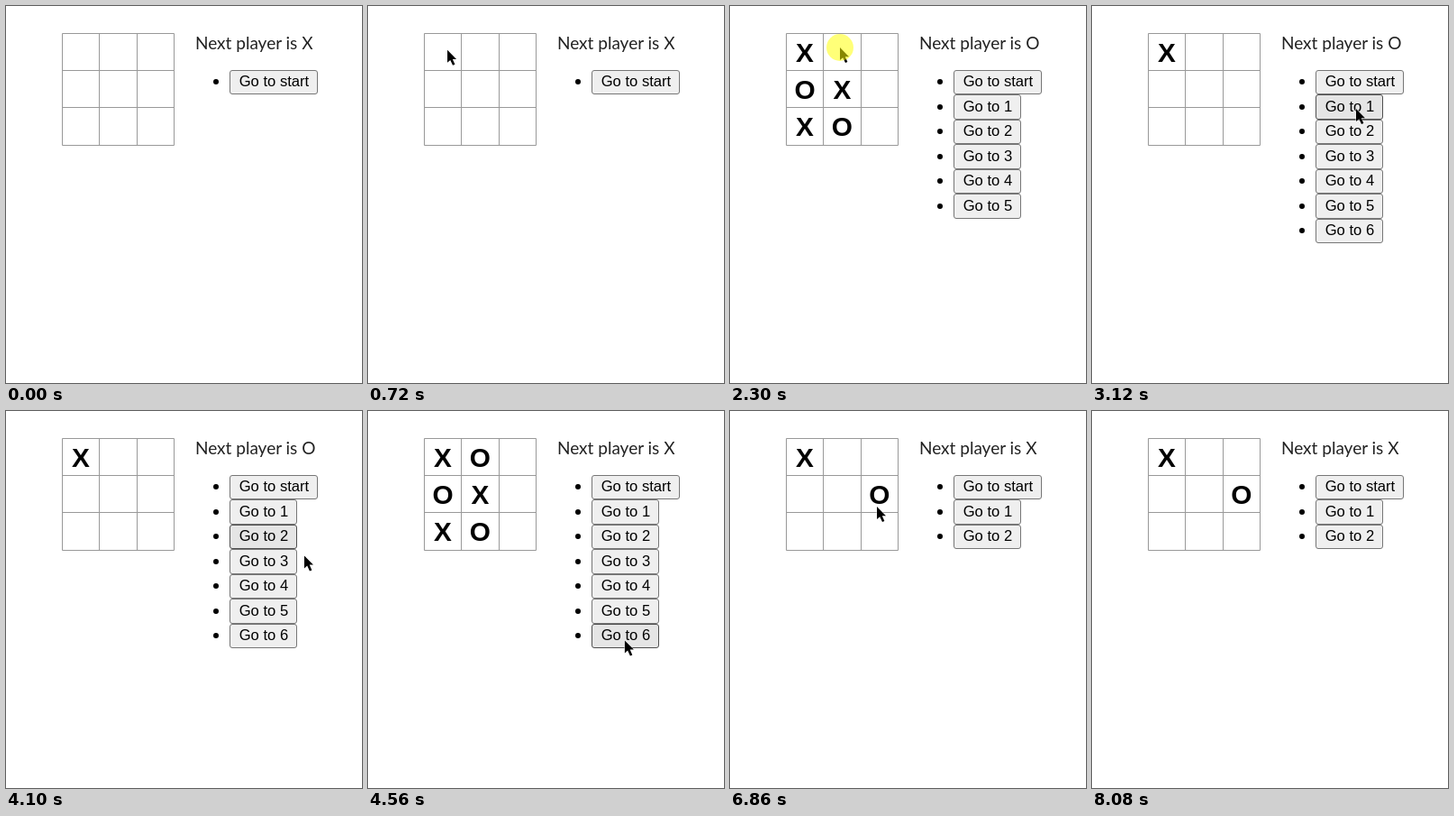
Animation of 395 by 418 pixels, one loop 8.59 s. Source, as an HTML page:

```html
<!DOCTYPE html>
<html lang="en">
<head>
<meta charset="utf-8">
<title>Tic-tac-toe</title>
<style>
  html, body { margin: 0; width: 100%; height: 100%; overflow: hidden; background: #fff; }
  svg { display: block; }
  .grid { fill: none; stroke: #999; }
  .mark { font: bold 29.8px "Liberation Sans", Arial, sans-serif; text-anchor: middle; }
  .status { font: 19px Lato, sans-serif; fill: #222; }
  .button { font: 16.6px "Liberation Sans", Arial, sans-serif; }
  .button rect { fill: #efefef; stroke: #767676; }
  .button.hover rect { fill: #e5e5e5; stroke: #4f4f4f; }
</style>
</head>
<body>
<svg id="stage" width="395" height="418"></svg>
<script>
const LOOP = 8590, ENTER = 30, EXIT = 8080;
const PRESS = 70, HOVER_LAG = 40, FIRST = 760, BEAT = 308;
const stage = document.getElementById('stage');
const game = [0, 3, 6, 7, 4, 1];

// press time, cells shown afterwards, moves listed
const clicks = [
  ...game.map((_, i) => [FIRST + i * BEAT, game.slice(0, i + 1), i + 1]),
  [3010, [0], 6], [4460, game, 6], [5640, [0], 6], [6560, [0, 5], 2]
];

const mix = (a, b, u) => a + (b - a) * u;
const ease = u => u * u * (3 - 2 * u);
const glide = (from, to, a, b) => [from, to, u => a.map((v, k) => mix(v, b[k], ease(u)))];

// where the pointer aims inside a cell
function aim(cell) {
  const col = cell % 3, row = Math.floor(cell / 3);
  return [86 + 36 * col + 2.5 * row, 46 + 43 * row];
}

// one clockwise lap around the move list, slowing down
function lap(u) {
  const angle = mix(-70, 438, u * (4 - u) / 3) * Math.PI / 180;
  return [272 + 62 * Math.cos(angle), 183 + 73 * Math.sin(angle)];
}

// up over the status line, then down along the right side
const swing = u => [
  mix(163, 351, u) + 105 * Math.sin(Math.PI * u),
  mix(106, 168, u) - 80 * Math.sin(2 * Math.PI * u)
];

const first = [293, 114], back = [293, 122], middle = [163, 106];
const motion = [
  glide(ENTER, FIRST, [337, 374], aim(game[0])),
  ...game.slice(1).map((cell, i) => {
    const press = FIRST + (i + 1) * BEAT;
    return glide(press - BEAT / 2, press, aim(game[i]), aim(cell));
  }),
  glide(2600, 2780, aim(game[5]), first),
  [3480, 4310, lap],
  glide(5200, 5470, lap(1), back),
  glide(5920, 6100, back, middle),
  [7010, 7620, swing],
  glide(7870, EXIT, swing(1), [303, 420])
];

function pointer(t) {
  if (t < ENTER || t >= EXIT) return null;
  const [from, to, at] = motion.findLast(m => t >= m[0]);
  return at(Math.min(1, (t - from) / (to - from)));
}

function button(n, at) {
  const top = Math.floor(71 + n * 27.5), base = Math.ceil(71 + n * 27.5);
  const w = n ? 74 : 97, h = base - top + 26;
  const over = at && at[0] >= 248 && at[0] < 249 + w && at[1] >= top && at[1] <= top + h;
  return `<circle cx="233" cy="${base + 13}" r="3"/>
    <g class="button${over ? ' hover' : ''}">
      <rect x="248.5" y="${top + .5}" width="${w}" height="${h}" rx="2.5"/>
      <text x="258.7" y="${base + 18}">Go to ${n || 'start'}</text>
    </g>`;
}

function draw(t) {
  const [, cells, moves] = clicks.findLast(c => t >= c[0] + PRESS) || [0, [], 0];
  const at = pointer(t), hot = pointer(t - HOVER_LAG);
  const pressed = clicks.some(c => t >= c[0] && t < c[0] + PRESS);
  let out = '<path class="grid" d="M62.5 30.5H186.5V154.5H62.5ZM103.5 30V154M145.5 30V154M62 71.5H186M62 112.5H186"/>';
  cells.forEach((c, i) => {
    out += `<text class="mark" x="${83 + c % 3 * 41.4}" y="${61.5 + Math.floor(c / 3) * 41.2}">${'XO'[i % 2]}</text>`;
  });
  out += `<text class="status" x="210" y="48">Next player is ${'XO'[cells.length % 2]}</text>`;
  for (let n = 0; n <= moves; n++) out += button(n, hot);
  if (at) {
    const halo = pressed ? '<circle r="15" fill="#ff0" opacity=".53"/>' : '';
    out += `<g transform="translate(${at})">
      <path d="M0 0V14L3.2 11.2 6 17 8.4 16 5.8 10.2H10Z" stroke="#fff" stroke-width=".8" paint-order="stroke"/>${halo}</g>`;
  }
  stage.innerHTML = out;
}

const start = performance.now();
function frame() {
  draw((performance.now() - start) % LOOP);
  requestAnimationFrame(frame);
}
draw(0);
requestAnimationFrame(frame);
</script>
</body>
</html>
```
